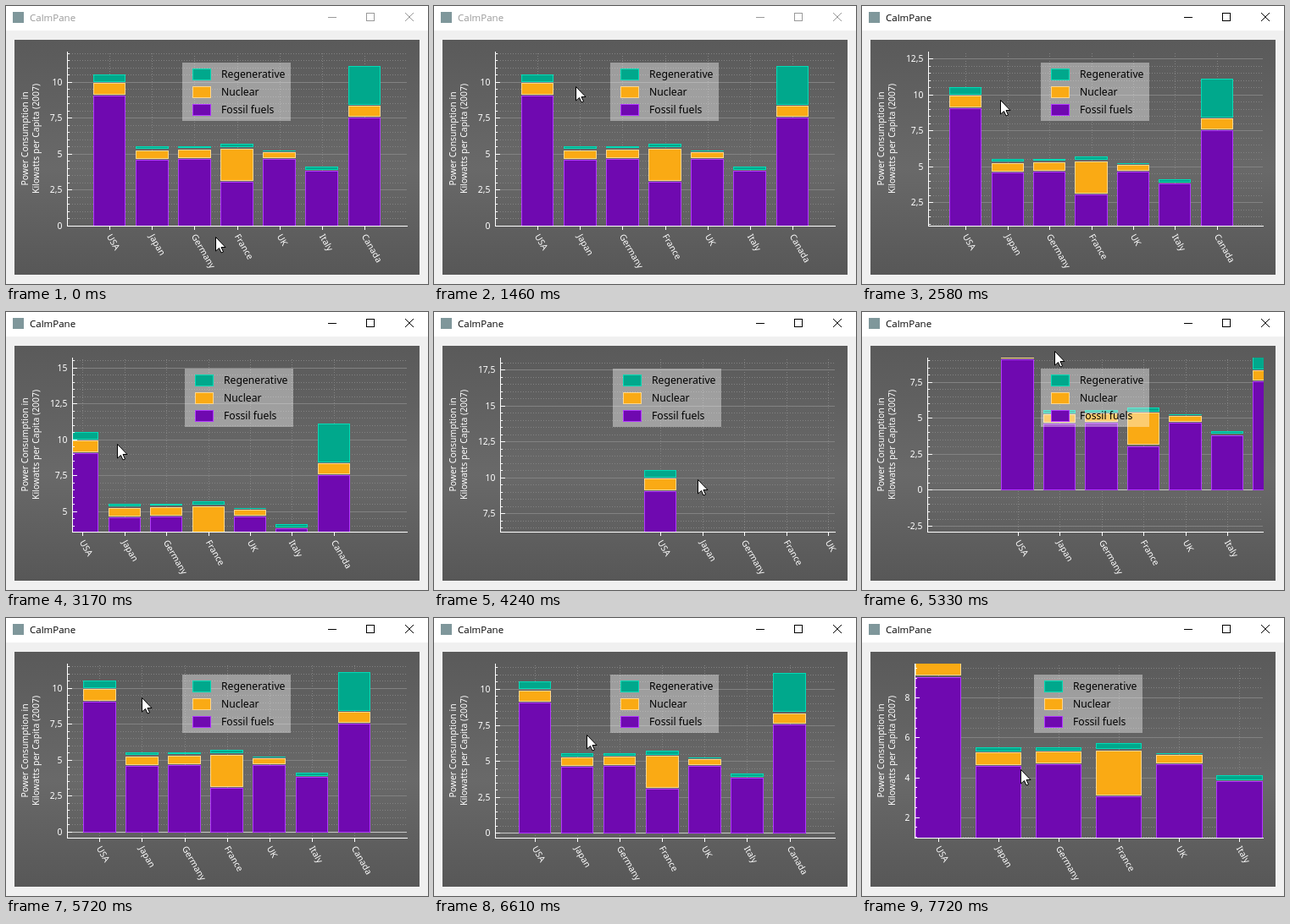
Animation, 498 px wide and 329 px high, one loop 8 s. Source, as an HTML page with a canvas:

```html
<!DOCTYPE html>
<html lang="en">
<head>
<meta charset="utf-8">
<title>Chart window</title>
<style>
  html, body { margin: 0; width: 100%; height: 100%; overflow: hidden; background: #f0f0f0; }
  canvas { display: block; width: 498px; height: 329px; }
</style>
</head>
<body>
<canvas id="stage" width="498" height="329"></canvas>
<script>
const ctx = document.getElementById('stage').getContext('2d');
const LOOP = 8000;
const TOP = 54, BOTTOM = 260, RIGHT = 473;
const SMALL = '10.4px "Noto Sans", "Open Sans", sans-serif';
const LEGEND = '12.2px "Noto Sans", "Open Sans", sans-serif';
const TITLE = '11.5px "Open Sans", "Noto Sans", sans-serif';

// country, total, shares of fossil / nuclear / regenerative
const DATA = [
  ['USA', 10.5, 0.86, 0.08, 0.06],
  ['Japan', 5.5, 0.83, 0.12, 0.05],
  ['Germany', 5.5, 0.84, 0.12, 0.04],
  ['France', 5.8, 0.52, 0.40, 0.06],
  ['UK', 5.2, 0.89, 0.09, 0.02],
  ['Italy', 4.2, 0.90, 0, 0.07],
  ['Canada', 11.2, 0.67, 0.07, 0.25]
];
const SERIES = [
  { name: 'Fossil fuels', fill: 'rgb(111,9,176)', pen: 'rgb(178,57,255)' },
  { name: 'Nuclear', fill: 'rgb(250,170,20)', pen: 'rgb(255,215,140)' },
  { name: 'Regenerative', fill: 'rgb(0,168,140)', pen: 'rgb(0,218,182)' }
];

// start, end and number of screen updates in each burst of activity
const BURSTS = [[500, 1460, 8], [2310, 5850, 27], [6310, 7720, 10]];

// update count, pointer x, pointer y, x axis minimum, y axis minimum
const KEYS = [
  [0, 248, 273, 0, 0],
  [8, 168, 95, 0, 0],
  [11, 164, 111, 0.101, 0.881],
  [15, 132, 156, 0.749, 3.583],
  [19, 205, 190, -0.72, 5.6],
  [23, 312, 198, -2.836, 6.226],
  [27, 332, 55, -3.273, -2.232],
  [29, 290, 22, -2.43, -4.17],
  [34, 161, 94, 0.236, -0.411],
  [35, 168, 95, 0.065, -0.34],
  [39, 188, 179, 0.065, -0.34],
  [45, 188, 179, 0.065, -0.34]
];
const ANCHOR = { x: 2.02, y: 4.37 };

function updateCount(t) {
  return BURSTS.reduce((sum, [a, b, n]) => {
    const done = Math.floor((t - a) / (b - a) * (n - 1) + 0.03) + 1;
    return sum + Math.min(n, Math.max(0, done));
  }, 0);
}

function slope(i, c) {
  if (i === 0 || i === KEYS.length - 1) return 0;
  const [p, q, r] = [KEYS[i - 1], KEYS[i], KEYS[i + 1]];
  const a = (q[c] - p[c]) / (q[0] - p[0]);
  const b = (r[c] - q[c]) / (r[0] - q[0]);
  return a * b <= 0 ? 0 : 2 * a * b / (a + b);
}

// monotone cubic through the keys
function track(k, c) {
  let i = 0;
  while (i < KEYS.length - 2 && k >= KEYS[i + 1][0]) i++;
  const p = KEYS[i], q = KEYS[i + 1], h = q[0] - p[0];
  const u = (k - p[0]) / h, v = 1 - u;
  return p[c] * (1 + 2 * u) * v * v + slope(i, c) * h * u * v * v +
         q[c] * u * u * (3 - 2 * u) - slope(i + 1, c) * h * u * u * v;
}

const format = v => String(v).replace('.', ',');

function labelWidth(s) {
  return [...s].reduce((w, ch) => w + (ch === ',' ? 4 : ch === '-' ? 5 : 6), 0);
}

function line(x1, y1, x2, y2, color, dotted) {
  ctx.strokeStyle = color;
  ctx.setLineDash(dotted ? [1, 2] : []);
  ctx.beginPath();
  ctx.moveTo(x1, y1);
  ctx.lineTo(x2, y2);
  ctx.stroke();
  ctx.setLineDash([]);
}
const hLine = (x1, x2, y, color, dotted) => line(x1, y + 0.5, x2, y + 0.5, color, dotted);
const vLine = (x, y1, y2, color, dotted) => line(x + 0.5, y1, x + 0.5, y2, color, dotted);

function box(x, y, w, h, s) {
  ctx.fillStyle = s.fill;
  ctx.fillRect(x, y, w, h);
  ctx.strokeStyle = s.pen;
  ctx.strokeRect(x + 0.5, y + 0.5, w, h);
}

function text(s, x, y, font, color, align = 'left') {
  ctx.font = font;
  ctx.fillStyle = color;
  ctx.textAlign = align;
  ctx.fillText(s, x, y);
}

function rotated(x, y, angle, draw) {
  ctx.save();
  ctx.translate(x, y);
  ctx.rotate(angle);
  draw();
  ctx.restore();
}

function drawWindow(active) {
  ctx.fillStyle = '#f0f0f0';
  ctx.fillRect(0, 0, 498, 329);
  ctx.fillStyle = '#fff';
  ctx.fillRect(0, 0, 498, 29);
  ctx.fillStyle = '#7f979b';
  ctx.fillRect(8, 7, 13, 13);
  const ink = active ? '#000' : '#999';
  text('CalmPane', 28, 18, TITLE, ink);
  hLine(380, 390, 13, ink);
  ctx.strokeRect(425.5, 8.5, 9, 9);
  line(471, 8, 481, 18, ink);
  line(481, 8, 471, 18, ink);

  const g = ctx.createLinearGradient(0, 40, 0, 440);
  g.addColorStop(0, 'rgb(90,90,90)');
  g.addColorStop(0.38, 'rgb(105,105,105)');
  g.addColorStop(1, 'rgb(70,70,70)');
  ctx.fillStyle = g;
  ctx.fillRect(10, 40, 478, 278);
}

// bars snap down to whole pixels, lines snap to the nearest one
function drawBars(px, py) {
  for (let s = 2; s >= 0; s--) {
    DATA.forEach((d, i) => {
      const value = d[1] * d[2 + s];
      if (!value) return;
      let base = 0;
      for (let j = 0; j < s; j++) base += d[1] * d[2 + j];
      const x1 = Math.floor(px(i + 0.625)), x2 = Math.floor(px(i + 1.375));
      const y1 = Math.floor(py(base + value));
      const y2 = Math.max(y1, Math.floor(py(base) - (s ? 2.2 : 0)));
      box(x1, y1, x2 - x1, y2 - y1, SERIES[s]);
    });
  }
}

function drawLegend(left) {
  const x = Math.floor((left + RIGHT) / 2 - 64);
  ctx.fillStyle = 'rgba(255,255,255,0.392)';
  ctx.fillRect(x, 67, 128, 69);
  [2, 1, 0].forEach((s, row) => {
    box(x + 12, 74 + row * 21, 21, 13, SERIES[s]);
    text(SERIES[s].name, x + 46, 85 + row * 21, LEGEND, '#000');
  });
}

function drawChart(xMin, yMin, zoom) {
  const f = Math.pow(0.85, zoom);
  const x0 = ANCHOR.x - (ANCHOR.x - xMin) * f;
  const y0 = ANCHOR.y - (ANCHOR.y - yMin) * f;
  const xSpan = 8 * f, ySpan = 12.1 * f;
  const step = zoom ? 2 : 2.5;

  const ticks = [];
  for (let i = Math.ceil(y0 * 2); i <= Math.floor((y0 + ySpan) * 2); i++) {
    ticks.push({ v: i / 2, major: (i / 2) % step === 0 });
  }
  const widest = Math.max(...ticks.filter(t => t.major).map(t => labelWidth(format(t.v))));
  const left = 56 + widest;
  const px = v => left + (v - x0) / xSpan * (RIGHT - left);
  const py = v => BOTTOM - (v - y0) / ySpan * (BOTTOM - TOP);
  const shown = DATA.map((d, i) => ({ name: d[0], x: Math.round(px(i + 1)) }))
    .filter(d => d.x >= left && d.x <= RIGHT);

  shown.forEach(d => vLine(d.x, BOTTOM + 1, TOP, 'rgb(130,130,130)', true));
  ticks.forEach(t => {
    const color = t.v === 0 ? 'rgb(200,200,200)' : 'rgb(130,130,130)';
    hLine(left, RIGHT, Math.round(py(t.v)), color, !t.major);
  });

  ctx.save();
  ctx.beginPath();
  ctx.rect(left, TOP, RIGHT - left + 1, BOTTOM - TOP + 1);
  ctx.clip();
  drawBars(px, py);
  ctx.restore();

  vLine(left, TOP, BOTTOM + 1, '#fff');
  hLine(left, RIGHT + 1, BOTTOM, '#fff');
  ticks.forEach(t => {
    const y = Math.round(py(t.v));
    hLine(left, left + (t.major ? 6 : 3), y, '#fff');
    if (t.major) text(format(t.v), left - 5.5, y + 4, SMALL, '#fff', 'right');
  });
  shown.forEach(d => {
    vLine(d.x, BOTTOM, BOTTOM + 5, '#fff');
    rotated(d.x, 270.5, Math.PI / 3, () => text(d.name, 0, 4, SMALL, '#fff'));
  });
  rotated(26, 157, -Math.PI / 2, () => {
    text('Power Consumption in', 0, 0, SMALL, '#fff', 'center');
    text('Kilowatts per Capita (2007)', 0, 13, SMALL, '#fff', 'center');
  });
  drawLegend(left);
}

function drawPointer(x, y) {
  const shape = new Path2D('M0 0V16.5L4 13L6.5 18.5L9 17.5L6.5 12H11.5Z');
  ctx.save();
  ctx.translate(Math.round(x) - 0.5, Math.round(y) + 0.5);
  ctx.fillStyle = '#fff';
  ctx.fill(shape);
  ctx.strokeStyle = '#000';
  ctx.stroke(shape);
  ctx.restore();
}

function frame(now) {
  const t = now % LOOP;
  const k = updateCount(t);
  const zoom = k < 41 ? 0 : k < 44 ? 1 : 2;
  ctx.lineWidth = 1;
  drawWindow(t >= 1880);
  drawChart(track(k, 3), track(k, 4), zoom);
  drawPointer(track(k, 1), track(k, 2));
  requestAnimationFrame(frame);
}
requestAnimationFrame(frame);
</script>
</body>
</html>
```
